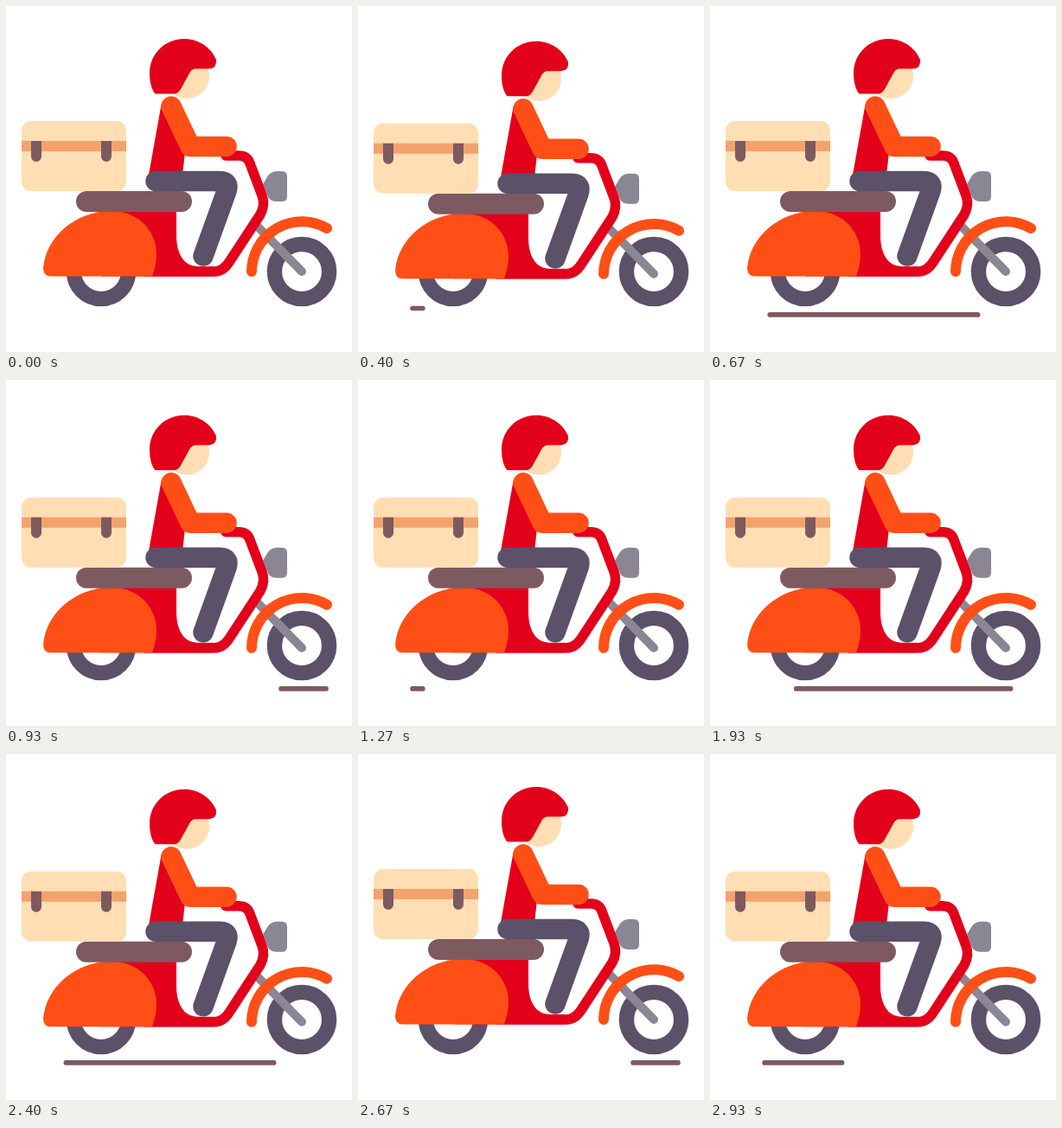
An HTML page that plays this animation: 400x400 px, repeating every 3000 ms.

```html
<!DOCTYPE html>
<html lang="en">
<head>
<meta charset="utf-8">
<title>Delivery scooter</title>
<style>
  html, body { margin: 0; width: 100%; height: 100%; overflow: hidden; background: #fff; }
  svg { display: block; width: 100%; height: 100%; }
  .line { fill: none; stroke-linecap: round; stroke-linejoin: round; }
  .red { fill: #e3001b; }
  .orange { fill: #ff4f17; }
  .cream { fill: #ffdeb3; }
  .brown { fill: #7d5a5f; }
  .grey { fill: #8b8693; }
</style>
</head>
<body>
<svg viewBox="0 0 400 400">
  <path id="road" class="line" stroke="#7d5a5f" stroke-width="5.6"/>
  <g fill="#fff" stroke="#5b5168" stroke-width="17.4">
    <circle cx="110" cy="307" r="31.6"/>
    <circle cx="342" cy="307" r="31.6"/>
  </g>
  <g id="bike">
    <!-- fork, fender and lamp -->
    <path class="line" stroke="#8b8693" stroke-width="10" d="M288 255L342 310"/>
    <path class="line" stroke="#ff4f17" stroke-width="12" d="M284 310A58 58 0 0 1 371 260"/>
    <path class="grey" d="M297 209L303 199Q307 194 314 194H319Q325 194 325 200V223Q325 229 319 229H313Q306 229 303 224Z"/>
    <!-- frame -->
    <path class="red" d="M110 240H197V268C197 290 206 304 222 304H240V315.5H110Z"/>
    <path class="line" stroke="#e3001b" stroke-width="11.5" d="M254 176H269Q279 176 282 185L296 222Q300 233 294 244L258 299Q251 310 240 310H160"/>
    <path class="orange" d="M52 315.5Q43 315.5 43 306C46 270 80 240 122 240C152 240 174 262 174 290Q174 302 169 315.5Z"/>
    <rect class="brown" x="81" y="217" width="134" height="24" rx="12"/>
    <!-- box -->
    <rect class="cream" x="18" y="136" width="121" height="81" rx="11"/>
    <path fill="#f4a26c" d="M18 159H139V171H18Z"/>
    <path class="brown" d="M29 159H41V177A6 6 0 0 1 29 177ZM110 159H122V177A6 6 0 0 1 110 177Z"/>
    <!-- rider -->
    <path class="red" d="M179.5 117L165 198H204L207 172L191 119Z"/>
    <path class="line" stroke="#5b5168" stroke-width="23.5" d="M173 205.5H247Q259 205.5 255 217L228 292"/>
    <path class="line" stroke="#ff4f17" stroke-width="23.5" d="M191 119L213 165.4H255"/>
    <circle class="cream" cx="209" cy="84" r="26"/>
    <path class="red" d="M172 104C168 99 166 90 166 81C166 58 184 41 206 41C223 41 237 51 243 65Q244 75 235 75.5H218Q215 76 213 79L202 99Q199 104.5 194 104.5H175Q173 104.5 172 104Z"/>
  </g>
</svg>
<script>
  const LOOP = 3000, FPS = 15, DASH = 1300 / 3, BOB = 500 / 3;
  const RIGHT = 370, LEFT = 63;
  const road = document.getElementById('road');
  const bike = document.getElementById('bike');

  function ease(t, start, end) {
    const x = Math.min(1, Math.max(0, (t - start) / (end - start)));
    return x * x * (3 - 2 * x);
  }

  function draw(now) {
    // motion is stepped at 15 pictures per second
    const step = Math.floor((now % LOOP + 4) * FPS / 1000) % (LOOP * FPS / 1000);
    const t = step * 1000 / FPS;

    const drop = 1.55 * (1 - Math.cos(2 * Math.PI * t / BOB));
    bike.setAttribute('transform', `translate(0 ${(drop - 3).toFixed(2)})`);

    // the head of the road line runs left, its tail follows
    const phase = t % DASH;
    const head = ease(phase, 0, 255), tail = ease(phase, 154, 433);
    const x = part => RIGHT + (LEFT - RIGHT) * part;
    const y = t < DASH ? 349.5 : 356.9;
    road.setAttribute('d', head > tail ? `M${x(tail)} ${y}H${x(head)}` : '');

    requestAnimationFrame(draw);
  }

  draw(performance.now());
</script>
</body>
</html>
```
